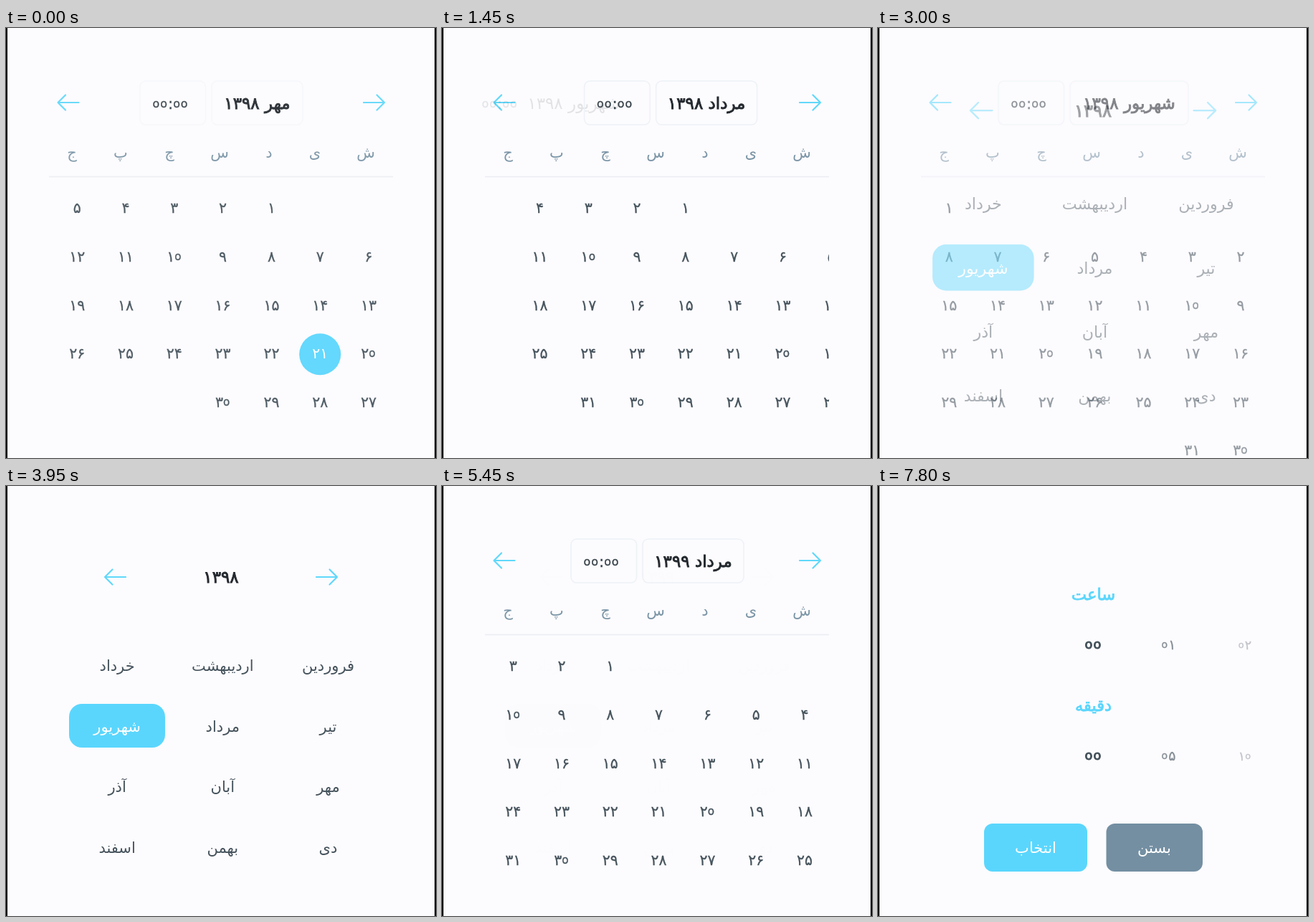
An HTML page that plays this animation: 600x600 px, repeating every 8000 ms.

```html
<!DOCTYPE html>
<html lang="fa">
<head>
<meta charset="utf-8">
<title>Date picker</title>
<style>
  html, body { margin: 0; width: 100%; height: 100%; overflow: hidden; background: #fcfbfe; }
  svg { display: block; width: 100vw; height: 100vh; }
  text { font-family: "DejaVu Sans", sans-serif; font-size: 21px; text-anchor: middle; direction: rtl; fill: #44525b; }
  .num { direction: ltr; unicode-bidi: bidi-override; font-size: 20.5px; stroke: #44525b; stroke-width: .3; }
  .zero { font-size: .74em; baseline-shift: 2px; letter-spacing: 1px; }
  .title { font-size: 23px; fill: #23292e; stroke: #23292e; stroke-width: .9; }
  .plain { font-size: 23px; fill: #23292e; }
  .clock { font-size: 21.5px; fill: #343d43; }
  .week { font-size: 21px; fill: #7b95a6; }
  .light { fill: #fff; stroke: none; }
  .label { font-size: 22.5px; fill: #5ad6fd; stroke: #5ad6fd; stroke-width: .9; }
  .now { font-size: 24px; stroke-width: 1; }
  .soon { font-size: 19px; opacity: .65; }
  .later { font-size: 17.5px; opacity: .32; }
  .arrow { fill: none; stroke: #60d8fa; stroke-width: 2.2; stroke-linecap: round; stroke-linejoin: round; }
  .box { fill: none; stroke: #edf2f6; stroke-width: 1.5; }
  .accent { fill: #5ad6fd; }
  .muted { fill: #748fa2; }
</style>
</head>
<body>
<svg id="stage" viewBox="0 0 600 600"></svg>
<script>
const LOOP = 8000, SLIDE = 166, COLUMN = 67.8, ROW = 67.6;
const MONTHS = ['فروردین', 'اردیبهشت', 'خرداد', 'تیر', 'مرداد', 'شهریور',
                'مهر', 'آبان', 'آذر', 'دی', 'بهمن', 'اسفند'];
const WEEK = [['ش', 502], ['ی', 431], ['د', 367], ['س', 298], ['چ', 228], ['پ', 160], ['ج', 92]];

// first: weekday column of day 1; width: space taken by the title text
const PAGES = [
  { month: 6, year: 1398, first: 2, days: 30, width: 92, picked: 21 },
  { month: 5, year: 1398, first: 6, days: 31, width: 130 },
  { month: 4, year: 1398, first: 3, days: 31, width: 106 },
  { month: 4, year: 1399, first: 4, days: 31, width: 106, picked: 14 }
];
// dir 1: the new page enters from the right, -1: from the left
const TURNS = [
  { at: -1000, page: 0, dir: 0 },
  { at: 827, page: 1, dir: 1 },
  { at: 1327, page: 2, dir: 1 },
  { at: 2225, page: 1, dir: -1 },
  { at: 4700, page: 3, dir: 0 }
];

const persian = n => String(n).replace(/\d/g, d => String.fromCharCode(0x6f0 + +d));
const ringZeros = s => s.replace(/۰/g, '<tspan class="zero">o</tspan>');
const text = (x, y, s, cls = '') => `<text x="${x}" y="${y}" class="${cls}">${s}</text>`;
const number = (x, y, n, cls = '') => text(x, y, ringZeros(persian(n)), 'num ' + cls);
const group = (id, body) => `<g id="${id}">${body}</g>`;
const rect = (x, y, w, h, r, cls) =>
  `<rect x="${x}" y="${y}" width="${w}" height="${h}" rx="${r}" class="${cls}"/>`;
const arrow = (x, y, dir) =>
  `<path class="arrow" d="M${x - 14.5 * dir} ${y}h${29 * dir}m${-10.5 * dir} -10.5l${10.5 * dir} 10.5l${-10.5 * dir} 10.5"/>`;

const caption = p => `${MONTHS[p.month]} ${persian(p.year)}`;

function boxedTitle(p) {
  const box = p.width + 35, left = 300.5 - (box + 100) / 2;
  return `<g class="frames">${rect(left, 74, 91.5, 61, 8, 'box')}${rect(left + 100, 74, box, 61, 8, 'box')}</g>` +
    number(left + 42.5, 113, '00:00', 'clock') +
    text(left + 100 + box / 2, 113, caption(p), 'title');
}

function plainTitle(p) {
  const left = 300 - (p.width + 62) / 2;
  return number(left + 24, 113, '00:00', 'clock') +
    text(left + 62 + p.width / 2, 113, caption(p), 'plain');
}

function dayGrid(p, i) {
  let dates = '', mark = '';
  for (let day = 1; day <= p.days; day++) {
    const slot = p.first + day - 1;
    const x = 506 - COLUMN * (slot % 7), y = 252 + ROW * Math.floor(slot / 7);
    dates += number(x, y + 6.3, day);
    if (day === p.picked) {
      mark = `<circle cx="${x}" cy="${y + 1 - 0.5}" r="29" class="accent"/>` + number(x, y + 6.3, day, 'light');
    }
  }
  return dates + group('mark' + i, mark);
}

function calendar() {
  const pages = PAGES.map((p, i) =>
    group('old' + i, plainTitle(p)) + group('title' + i, boxedTitle(p))).join('');
  const grids = PAGES.map((p, i) => group('days' + i, dayGrid(p, i))).join('');
  return arrow(87, 104, -1) + arrow(513.5, 104, 1) + pages +
    WEEK.map(([s, x]) => text(x, 181, s, 'week')).join('') +
    '<path d="M60 207.5H540" stroke="#ecedf2" stroke-width="1.5"/>' +
    `<g clip-path="url(#window)">${grids}</g>`;
}

function monthPicker() {
  const names = MONTHS.map((name, i) =>
    text(449.5 - 147.2 * (i % 3), 258 + 84.5 * Math.floor(i / 3), name, i === 5 ? 'light' : '')).join('');
  return arrow(152.5, 127, -1) + arrow(447.5, 127, 1) +
    group('oldYear', text(300, 135, persian(1398), 'title')) +
    group('newYear', text(300, 135, persian(1399), 'title')) +
    rect(88, 304, 134, 61, 18, 'accent') + names;
}

function wheel(y, step) {
  return number(300.5, y + 1, '00', 'now') +
    number(405.5, y, String(step).padStart(2, '0'), 'soon') +
    number(512, y, String(2 * step).padStart(2, '0'), 'later');
}

function timePicker() {
  return text(300.5, 159, 'ساعت', 'label') + wheel(228, 1) +
    text(300.5, 314, 'دقیقه', 'label') + wheel(383, 5) +
    rect(148, 471, 144, 67, 12, 'accent') + text(220, 512, 'انتخاب', 'light') +
    rect(318.5, 471, 134.5, 67, 12, 'muted') + text(385.5, 512, 'بستن', 'light');
}

document.getElementById('stage').innerHTML =
  '<clipPath id="window"><path d="M60 210H540V600H60z"/></clipPath>' +
  '<path d="M0 0H600V600H0z" fill="#fcfbfe"/>' +
  group('calendar', calendar()) + group('months', monthPicker()) + group('time', timePicker()) +
  '<path d="M0 0H2V600H0zM598 0H600V600H598z"/>';

const el = {};
document.querySelectorAll('g[id]').forEach(g => el[g.id] = g);
const frames = document.querySelectorAll('.frames');
const clocks = document.querySelectorAll('#title3 .clock');

const progress = (t, start, length) => Math.min(1, Math.max(0, (t - start) / length));
const quintOut = u => 1 - (1 - u) ** 5;

// cubic-bezier(.25, .1, .25, 1)
function ease(u) {
  if (u <= 0 || u >= 1) return u;
  let low = 0, high = 1, s;
  for (let i = 0; i < 24; i++) {
    s = (low + high) / 2;
    const x = .75 * s * (1 - s) ** 2 + .75 * s * s * (1 - s) + s ** 3;
    if (x < u) low = s; else high = s;
  }
  return .3 * s * (1 - s) ** 2 + 3 * s * s * (1 - s) + s ** 3;
}

function show(g, opacity, transform = '') {
  g.setAttribute('display', opacity > 0.002 ? 'inline' : 'none');
  g.setAttribute('opacity', opacity);
  g.setAttribute('transform', transform);
}
const shift = x => `translate(${x} 0)`;
const zoom = k => `translate(300 338) scale(${k}) translate(-300 -338)`;

function render(t) {
  const toMonths = ease(progress(t, 2870, 500));
  const toDays = ease(progress(t, 5125, 350));
  const toTime = ease(progress(t, 7375, 430));
  const intro = progress(t, 0, 400);

  show(el.calendar, (.94 + .06 * intro) * (1 - toMonths + toDays - toTime));
  show(el.months, toMonths - toDays, zoom(1.1 - .1 * toMonths));
  show(el.time, toTime, zoom(1.1 - .1 * toTime));
  frames.forEach(f => f.setAttribute('opacity', .4 + .6 * intro));
  clocks.forEach(c => c.setAttribute('opacity', 1 - .25 * progress(t, 7075, 125)));

  const turnIndex = TURNS.findLastIndex(turn => t >= turn.at);
  const turn = TURNS[turnIndex], before = TURNS[turnIndex - 1];
  const p = quintOut(progress(t, turn.at, 350));
  const offset = turn.dir * SLIDE * (1 - p);
  PAGES.forEach((_, i) => {
    const current = i === turn.page ? 1 : 0;
    const leaving = before && turn.dir && i === before.page;
    show(el['title' + i], current, shift(offset));
    show(el['days' + i], current, shift(2 * offset));
    show(el['old' + i], leaving ? 1 - p : 0, shift(-turn.dir * SLIDE * p));
  });
  show(el.mark3, ease(progress(t, 6225, 325)));

  const y = quintOut(progress(t, 4225, 350));
  show(el.oldYear, 1 - y, shift(SLIDE * y));
  show(el.newYear, t >= 4225 ? 1 : 0, shift(-SLIDE * (1 - y)));
}

const began = performance.now();
function tick() {
  render((performance.now() - began) % LOOP);
  requestAnimationFrame(tick);
}
render(0);
requestAnimationFrame(tick);
</script>
</body>
</html>
```
